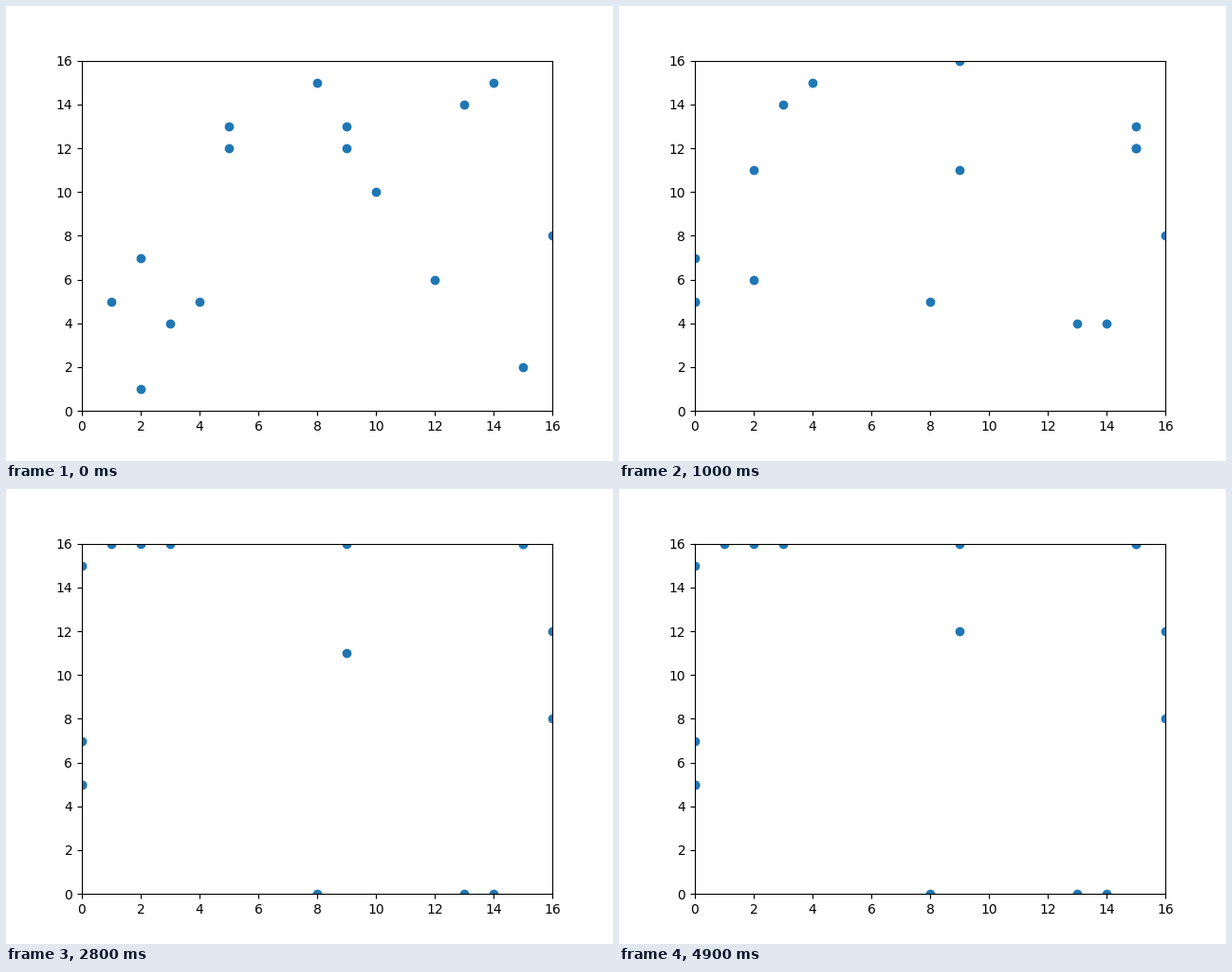
Write a matplotlib script that moves like this. It is 640 px wide and 480 px high and loops after 5 s.

```python
import matplotlib.pyplot as plt
import numpy as np
from matplotlib.animation import FuncAnimation

SIZE = 16
FRAMES = 50
INTERVAL = 100

HEADINGS = {"L": (-1, 0), "R": (1, 0), "U": (0, 1), "D": (0, -1)}

# Start x, start y and heading; walkers stop at the border.
STRAIGHT = [
    (1, 5, "L"), (4, 5, "L"), (2, 7, "L"), (14, 15, "L"),
    (5, 12, "R"), (16, 8, "R"),
    (2, 1, "U"), (3, 4, "U"), (15, 2, "U"), (9, 12, "U"),
    (8, 15, "D"), (13, 14, "D"),
]
# The same, then the step of the turn and the new heading.
TURNING = [
    (10, 10, "R", 4, "D"),
    (5, 13, "R", 10, "U"),
    (12, 6, "L", 11, "U"),
]


def walk(step, x, y, heading, turn=FRAMES, new_heading="U"):
    before, after = min(step, turn), max(step - turn, 0)
    position = (
        np.array([x, y])
        + before * np.array(HEADINGS[heading])
        + after * np.array(HEADINGS[new_heading])
    )
    return np.clip(position, 0, SIZE)


def pace(step):
    """Walk down from (9, 13), then go back and forth between two cells."""
    return (9, 13) if step == 0 else (9, 11 + step % 2)


def positions(step):
    return np.array([walk(step, *w) for w in STRAIGHT + TURNING] + [pace(step)])


fig, ax = plt.subplots(figsize=(6.4, 4.8), dpi=100)
ax.set_xlim(0, SIZE)
ax.set_ylim(0, SIZE)
dots, = ax.plot([], [], "o")


def update(step):
    dots.set_data(*positions(step).T)
    return (dots,)


anim = FuncAnimation(fig, update, frames=FRAMES, interval=INTERVAL,
                     repeat=True, repeat_delay=0)
plt.show()
```
